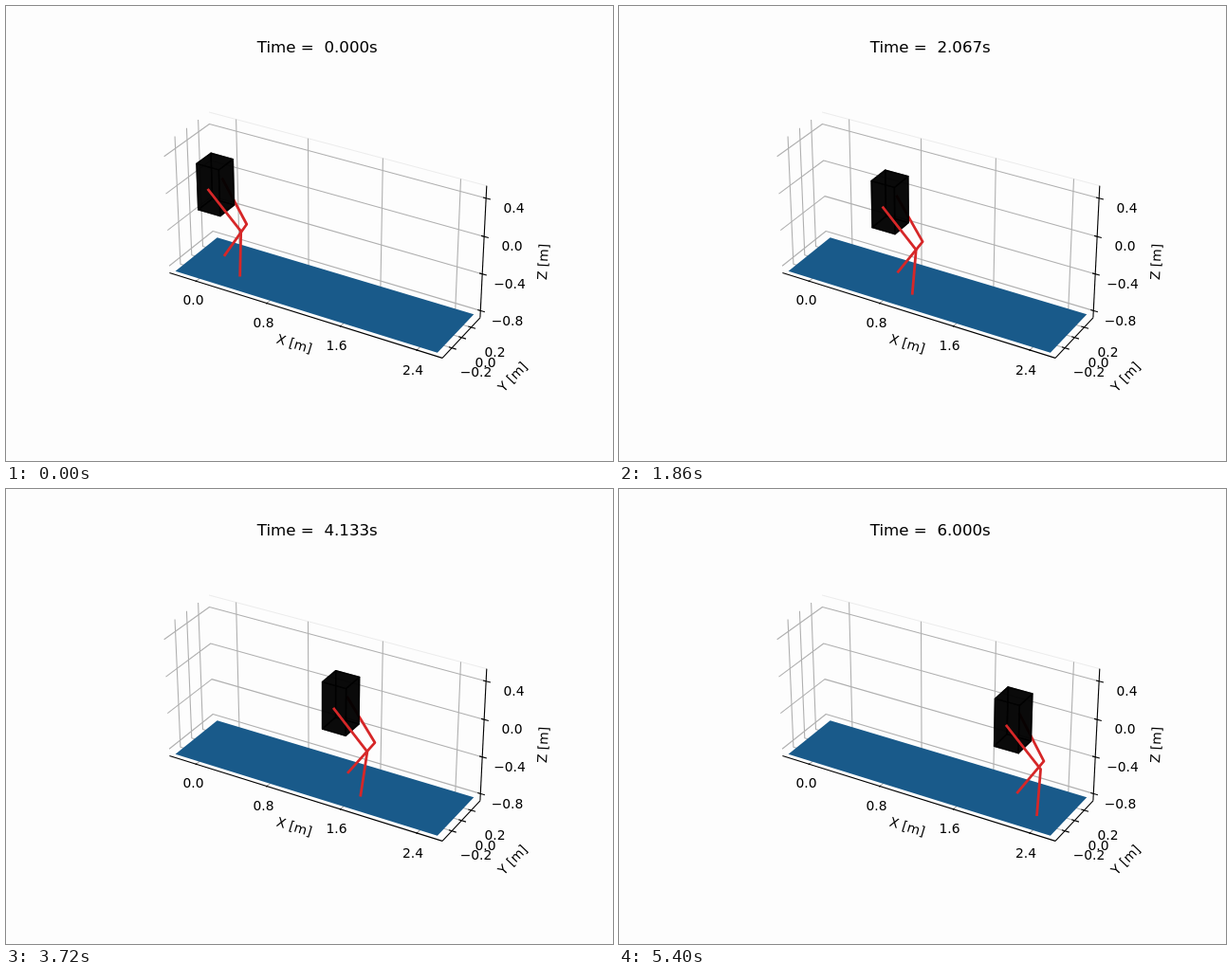
These frames come from a looping animation (640 by 480 pixels, 5.46 s). An HTML page with a canvas:

```html
<!DOCTYPE html>
<html>
<head>
<meta charset="utf-8">
<style>
  html, body { margin: 0; height: 100%; overflow: hidden; background: #fdfdfd; }
  canvas { display: block; }
</style>
</head>
<body>
<canvas id="stage" width="640" height="480"></canvas>
<script>
const ctx = document.getElementById('stage').getContext('2d');
const STEP = 60, FRAMES = 91, FPS = 15;
const SPEED = 1 / 3, LINK = 0.5, GROUND = -0.85, LIFT = 0.075;

// Axis limits in metres, with the small margin around the floor
const [x0, x1] = [-0.309, 2.659], [y0, y1] = [-0.3906, 0.3906], [z0, z1] = [-0.878, 0.528];

// Perspective camera: elevation 30 deg, azimuth -60 deg
function project([x, y, z]) {
  const X = (x - 1.175) * 0.5644, Y = y * 0.5644, Z = (z + 0.175) * 0.5644;
  const k = 1997.8 / (10 - 0.433 * X + 0.75 * Y - 0.5 * Z);
  return [333 + k * (0.866 * X + 0.5 * Y), 237.4 - k * (-0.25 * X + 0.433 * Y + 0.866 * Z)];
}

function trace(points, closed) {
  ctx.beginPath();
  points.forEach(p => ctx.lineTo(...project(p)));
  if (closed) ctx.closePath();
}

function line(color, width, ...points) {
  trace(points);
  ctx.strokeStyle = color;
  ctx.lineWidth = width;
  ctx.stroke();
}

function text(str, x, y, size = 13.89, angle = 0) {
  ctx.save();
  ctx.translate(x, y);
  ctx.rotate(angle * Math.PI / 180);
  ctx.font = size + 'px "DejaVu Sans", sans-serif';
  ctx.textAlign = 'center';
  ctx.fillStyle = '#000';
  ctx.fillText(str, 0, size * 0.365);
  ctx.restore();
}

function drawAxes() {
  const xs = [0, 0.8, 1.6, 2.4], ys = [-0.2, 0, 0.2], zs = [-0.8, -0.4, 0, 0.4];
  const grid = (...p) => line('#b0b0b0', 1.11, ...p);
  const axis = (...p) => line('#000', 1.11, ...p);
  ctx.lineCap = 'butt';

  line('#ececec', 1, [x0, y1, z1], [x1, y1, z1]);
  xs.forEach(x => grid([x, y0, z0], [x, y1, z0], [x, y1, z1]));
  ys.forEach(y => grid([x1, y, z0], [x0, y, z0], [x0, y, z1]));
  zs.forEach(z => grid([x0, y0, z], [x0, y1, z], [x1, y1, z]));

  axis([x0, y0, z0], [x1, y0, z0]);
  axis([x1, y0, z0], [x1, y1, z0]);
  axis([x1, y1, z0], [x1, y1, z1]);
  xs.forEach(x => axis([x, y0 - 0.012, z0], [x, y0 + 0.012, z0]));
  ys.forEach(y => axis([x1 - 0.03, y, z0], [x1 + 0.045, y, z0]));
  zs.forEach(z => axis([x1 - 0.03, y1, z], [x1 + 0.045, y1, z]));

  trace([[-0.25, -0.375, GROUND], [2.6, -0.375, GROUND], [2.6, 0.375, GROUND], [-0.25, 0.375, GROUND]], true);
  ctx.fillStyle = '#195a8a';
  ctx.fill();

  text('0.0', 197.5, 310);
  text('0.8', 271.5, 334);
  text('1.6', 348.5, 358);
  text('2.4', 429, 384);
  text('−0.2', 495.5, 386);
  text('0.0', 505.5, 375.5);
  text('0.2', 515.5, 364.5);
  text('0.4', 535.5, 213);
  text('0.0', 533.5, 253);
  text('−0.4', 531, 293);
  text('−0.8', 528.5, 331.5);
  text('X [m]', 304, 356, 13.89, 17);
  text('Y [m]', 534, 391, 13.89, -46.5);
  text('Z [m]', 566, 270, 13.89, -87);
}

function drawBody(x) {
  const corner = (a, b, c) => [x + a * 0.125, b * 0.125, c * 0.25];
  const square = [[-1, -1], [1, -1], [1, 1], [-1, 1]];
  ctx.fillStyle = 'rgba(0,0,0,0.8)';
  ctx.strokeStyle = 'rgba(0,0,0,0.8)';
  ctx.lineWidth = 1.39;
  for (const side of [-1, 1]) {
    for (const face of [
      square.map(([a, b]) => corner(a, b, side)),
      square.map(([a, b]) => corner(a, side, b)),
      square.map(([a, b]) => corner(side, a, b))
    ]) {
      trace(face, true);
      ctx.fill();
      ctx.stroke();
    }
  }
}

// Two-link leg with the knee bent forward
function drawLeg(hip, y, [foot, height]) {
  const dx = foot - hip, dist = Math.hypot(dx, height);
  const bend = Math.sqrt(LINK * LINK - dist * dist / 4) / dist;
  const knee = [hip + dx / 2 - height * bend, y, height / 2 + dx * bend];
  ctx.lineCap = 'square';
  line('#d62728', 2.78, [hip, y, 0], knee, [foot, y, height]);
}

function draw(t) {
  const hip = t * SPEED, step = Math.floor(t + 1e-9), p = t - step;
  const ease = (p + p * p * (3 - 2 * p)) / 2;
  const swing = [(step + 2 * ease) * SPEED, GROUND + 4 * LIFT * p * (1 - p)];
  const stance = [(step + 1) * SPEED, GROUND];
  const [far, near] = step % 2 ? [stance, swing] : [swing, stance];

  ctx.fillStyle = '#fdfdfd';
  ctx.fillRect(0, 0, 640, 480);
  ctx.lineJoin = 'round';
  drawAxes();
  drawLeg(hip, 0.125, far);
  drawBody(hip);
  drawLeg(hip, -0.125, near);
  text('Time =  ' + t.toFixed(3) + 's', 328.3, 43, 16.67);
}

function tick() {
  draw(Math.floor(performance.now() / STEP) % FRAMES / FPS);
  requestAnimationFrame(tick);
}
tick();
</script>
</body>
</html>
```
